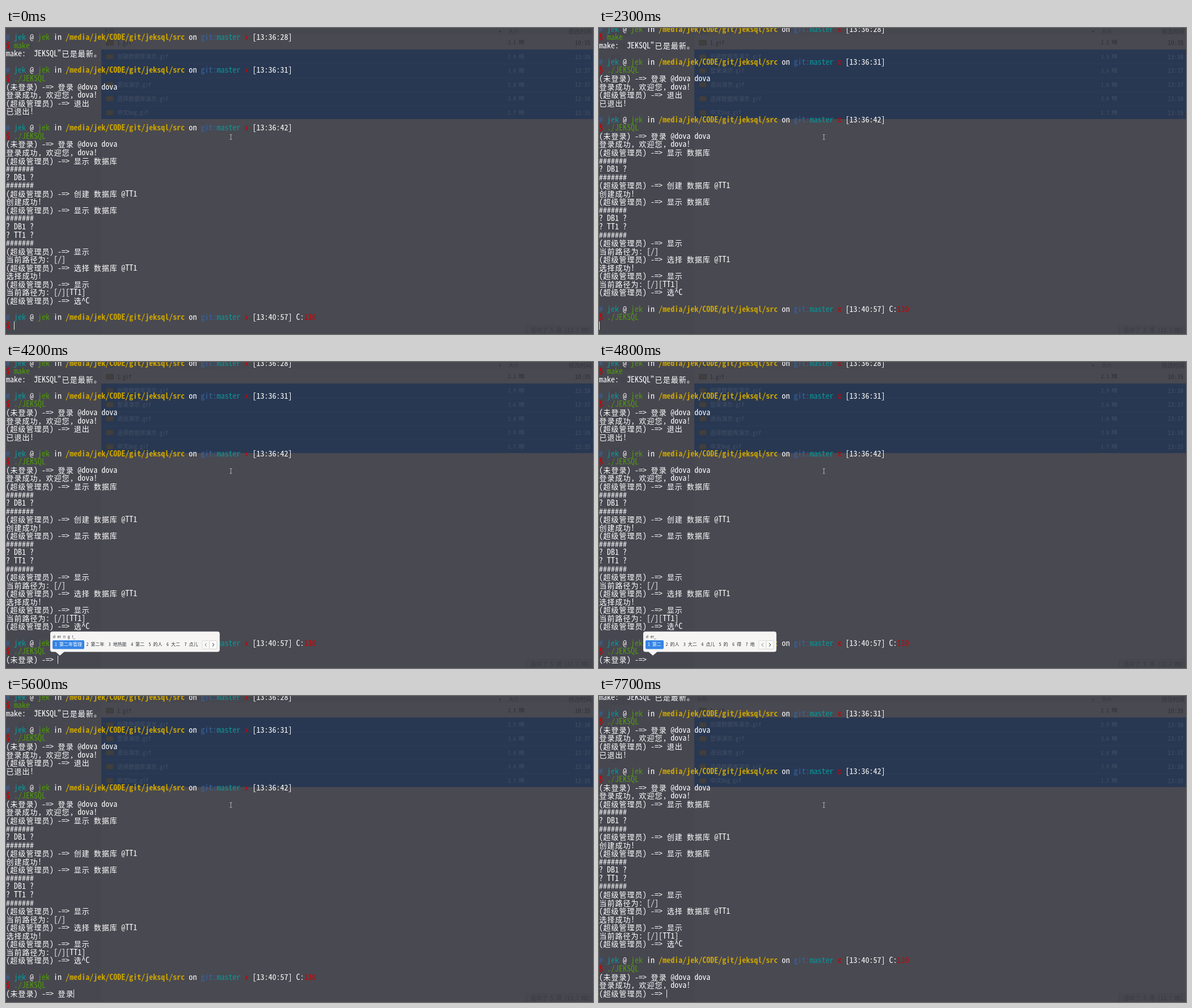
These frames come from a looping animation (1035 px wide and 541 px high, 8000 ms). An HTML page with a canvas:

```html
<!DOCTYPE html>
<html lang="zh-CN">
<head>
<meta charset="utf-8">
<title>Terminal session</title>
<style>
html, body { margin: 0; width: 100%; height: 100%; overflow: hidden; background: #494951; }
canvas { display: block; width: 1035px; height: 541px; }
</style>
</head>
<body>
<canvas id="stage"></canvas>
<script>
const W = 1035, H = 541, LOOP = 8000;
const CELL = 7.008, LINE = 14.557, LAST_Y = 526;
const MONO = '"Noto Sans Mono CJK SC", "Noto Sans CJK SC", "Noto Sans CJK", "Noto Sans Mono", monospace';
const SANS = '"Noto Sans CJK SC", "Noto Sans CJK", "Noto Sans", sans-serif';
const COLORS = {
  w: '#ffffff', b: '#3465a4', c: '#06989a', g: '#4e9a06',
  y: '#c9a400', r: '#cc0000', R: '#cc0000', d: '#5a5c5b', u: '#ffffff'
};
const BOLD = 'yR';

const canvas = document.getElementById('stage');
const ctx = canvas.getContext('2d');
const dpr = window.devicePixelRatio || 1;
canvas.width = W * dpr;
canvas.height = H * dpr;
ctx.scale(dpr, dpr);

// Choose the size at which one Latin letter fills one cell.
ctx.font = `100px ${MONO}`;
const latinSize = CELL * 100 / ctx.measureText('0').width;
const wideSize = 13;

const prompt = (time, tail = '') =>
  `~b# ~cjek~w @ ~gjek~w in ~y/media/jek/CODE/git/jeksql/src~w on ~bgit:~cmaster~r x~w [${time}]${tail}`;
const command = text => `~R$ ~g${text}`;
const guest = '(未登录) -=> ';
const admin = '(超级管理员) -=> ';
const rule = '#######';
const welcome = '登录成功，欢迎您，dova!';

const history = [
  prompt('13:36:28'), command('make'), 'make: “JEKSQL”已是最新。', '',
  prompt('13:36:31'), command('./JEKSQL'),
  guest + '登录 @dova dova', welcome, admin + '退出', '已退出!', '',
  prompt('13:36:42'), command('./JEKSQL'),
  guest + '登录 @dova dova', welcome,
  admin + '显示 数据库', rule, '? DB1 ?', rule,
  admin + '创建 数据库 @TT1', '创建成功!',
  admin + '显示 数据库', rule, '? DB1 ?', '? TT1 ?', rule,
  admin + '显示', '当前路径为: [/]',
  admin + '选择 数据库 @TT1', '选择成功!',
  admin + '显示', '当前路径为: [/][TT1]',
  admin + '选^C', '',
  prompt('13:40:57', ' C:~r130')
];
const started = [...history, command('./JEKSQL')];
const loggedIn = [...started, guest + '登录 @dova dova', welcome];

// Each step: start time, finished lines, current line, cursor column (-1 hides it).
const shell = [
  [0, history, '~R$ ', 2],
  [100, history, '~R$ ', -1],
  [600, history, '~R$ ', 2],
  [1100, history, '~R$ ~g.~d/JEKSQL', 3],
  [1300, history, '~R$ ~u./~dJEKSQL', 4],
  [1700, history, '~R$ ~R./J~dEKSQL', 5],
  [2100, history, command('./JEKSQL'), 10],
  [2300, started, '', 0],
  [2400, started, guest, 13],
  [3500, started, guest, -1],
  [4000, started, guest, 13],
  [4800, started, guest, -1],
  [5300, started, guest, 13]
];
const typed = [
  [5600, '登录'], [5700, '登录 '], [6200, '登录 @'], [6500, '登录 @do'],
  [6700, '登录 @dov'], [6800, '登录 @dova'], [7000, '登录 @dova '],
  [7100, '登录 @dova d'], [7300, '登录 @dova do'],
  [7400, '登录 @dova dov'], [7500, '登录 @dova dova']
];
for (const [time, text] of typed) shell.push([time, started, guest + text, 15 + text.length]);
shell.push([7700, loggedIn, admin, 17]);

// Input method window: start time, spelling, candidates.
const popup = [
  [0, '', ''],
  [3800, 'd', '的 都 大 到 对 点 多'],
  [4000, 'de', '的 得 德 地 嘚 锝 底'],
  [4100, 'd er n', '第二年 第二 的人 大二 点儿 的 得'],
  [4200, 'd er n g l', '第二年管理 第二年 地热能 第二 的人 大二 点儿'],
  [4500, 'd er n g', '第二年个 第二年 地热能 第二 的人 大二 点儿'],
  [4700, 'd er n', '第二年 第二 的人 大二 点儿 的 得'],
  [4800, 'd er', '第二 的人 大二 点儿 的 得 地'],
  [4900, 'de', '的 得 德 地 嘚 锝 底'],
  [5200, 'den', '得'],
  [5300, 'deng', '等 登 灯 瞪 蹬 凳 噔'],
  [5400, 'deng l', '登录 等了 登陆 等量 等离 灯笼 灯亮'],
  [5600, '', '']
];
const at = (steps, t) => steps.findLast(step => step[0] <= t);

function label(text, x, y, size, color, family = SANS) {
  ctx.font = `300 ${size}px ${family}`;
  ctx.fillStyle = color;
  ctx.fillText(text, x, y + size * 0.36);
}

function box(x, y, w, h, r, fill, stroke) {
  ctx.beginPath();
  ctx.roundRect(x, y, w, h, r);
  ctx.fillStyle = fill;
  ctx.fill();
  if (stroke) {
    ctx.strokeStyle = stroke;
    ctx.lineWidth = 0.6;
    ctx.stroke();
  }
}

function drawBackdrop() {
  ctx.fillStyle = '#494951';
  ctx.fillRect(0, 0, W, H);
  ctx.fillStyle = '#474750';
  ctx.fillRect(0, 0, 168, H);
  ['最近使用', '主目录', '桌面', '文档', '下载', '音乐', '图片', '视频', '回收站', '网络']
    .forEach((name, i) => label(name, 20, 11 + i * 20.6, 9, '#42424a'));

  ctx.fillStyle = '#47474f';
  ctx.fillRect(168, 0, W - 168, 12);
  label('名称', 173, 6, 9, '#3a3a42');
  label('▾', 869, 6, 8, '#35353c');
  label('大小', 886, 6, 9, '#35353c');
  label('修改时间', 992, 6, 10, '#35353c');

  ctx.fillStyle = '#293852';
  ctx.fillRect(168, 38, W - 168, 123);
  const files = [
    ['1.gif', '2.1', '10:35'], ['创建数据库演示.gif', '2.9', '13:38'],
    ['登录演示.gif', '3.6', '13:37'], ['退出演示.gif', '1.8', '13:37'],
    ['选择数据库演示.gif', '3.8', '13:38'], ['中文bug.gif', '1.7', '13:35']
  ];
  files.forEach(([name, size, time], i) => {
    const y = 26 + i * 24.75;
    const ink = i ? '#434f65' : '#2f2f36';
    if (i > 1) {
      ctx.fillStyle = '#2f3d57';
      ctx.fillRect(168, y - 12.7, W - 168, 0.8);
    }
    box(176.5, y - 4.5, 13, 9, 1.5, '#403f3d', '#33363a');
    label(name, 196, y, 10, ink, MONO);
    label(size + ' MB', 885, y, 9.6, ink, MONO);
    label(time, 1003, y, 11, ink, MONO);
  });
  box(917, 526, 125, 20, 2, '#47474f', '#42424a');
  label('选中了 5 项 (13.7 MB)', 925, 534, 10, '#3a3a42', MONO);
}

const isWide = ch => /[\u3000-\u9fff\uff00-\uffef]/.test(ch);

function drawLine(text, y) {
  let col = 0;
  const parts = ('~w' + text).split(/~(.)/);
  for (let i = 1; i < parts.length; i += 2) {
    const style = parts[i], from = col;
    const latinFont = `${BOLD.includes(style) ? 'bold ' : ''}${latinSize}px ${MONO}`;
    const wideFont = `300 ${wideSize}px ${SANS}`;
    ctx.fillStyle = COLORS[style];
    for (const ch of parts[i + 1]) {
      const wide = isWide(ch);
      ctx.font = wide ? wideFont : latinFont;
      ctx.fillText(ch, col * CELL + (wide ? CELL - wideSize / 2 : 0), y + 4.7);
      col += wide ? 2 : 1;
    }
    if (style === 'u') ctx.fillRect(from * CELL, y + 6.5, (col - from) * CELL, 0.7);
  }
}

function drawPointer() {
  ctx.strokeStyle = '#b8b8bc';
  ctx.lineWidth = 0.9;
  ctx.beginPath();
  ctx.moveTo(396.5, 188.5);
  ctx.lineTo(396.5, 197);
  for (const y of [188.5, 197]) {
    ctx.moveTo(394.5, y);
    ctx.lineTo(398.5, y);
  }
  ctx.stroke();
}

function drawArrow(x, dir, color) {
  ctx.strokeStyle = color;
  ctx.lineWidth = 1;
  ctx.beginPath();
  ctx.moveTo(x - dir * 1.4, 497);
  ctx.lineTo(x + dir * 1.4, 500);
  ctx.lineTo(x - dir * 1.4, 503);
  ctx.stroke();
}

function drawPopup(spelling, list) {
  const words = list.split(' ');
  const many = words.length > 1;
  const widths = words.map(word => 15.4 + 8 * word.length);
  const arrowsX = 86 + widths.reduce((a, b) => a + b, 0);
  const right = many ? arrowsX + 31 : 110;
  const top = many ? 476.5 : 479;

  box(78, top, right - 78, 512.5 - top, 4, '#f6f5f4');
  ctx.beginPath();
  ctx.moveTo(87, 512);
  ctx.lineTo(95, 519);
  ctx.lineTo(103, 512);
  ctx.fill();

  ctx.wordSpacing = '2.1px';
  label(spelling + '_', 83, many ? 486 : 488.5, 6.9, '#2e3436', '"Liberation Sans", sans-serif');
  ctx.wordSpacing = '0px';

  const y = many ? 499 : 501.5;
  box(82, many ? 492 : 495, widths[0] + 0.6, many ? 15.5 : 13, 2, '#3584e4');
  let x = 86;
  words.forEach((word, i) => {
    const ink = i ? '#2e3436' : '#ffffff';
    label(i + 1, x, y, 8, ink, MONO);
    label(word, x + 8, y, 8, ink);
    x += widths[i];
  });
  if (many) {
    box(arrowsX, 492.5, 13, 15, 2, '#f8f8f7', '#d2cecb');
    box(arrowsX + 13, 492.5, 13, 15, 2, '#fbfbfa', '#c4c0bc');
    drawArrow(arrowsX + 6.5, -1, '#777b7c');
    drawArrow(arrowsX + 19.5, 1, '#202426');
  }
}

function draw(t) {
  drawBackdrop();
  const [, lines, input, cursor] = at(shell, t);
  lines.forEach((text, i) => drawLine(text, LAST_Y - (lines.length - i) * LINE));
  drawLine(input, LAST_Y);
  if (cursor >= 0) {
    ctx.fillStyle = '#ffffff';
    ctx.fillRect(cursor * CELL, 519, 0.9, 14.5);
  }
  drawPointer();
  const [, spelling, words] = at(popup, t);
  if (words) drawPopup(spelling, words);
}

function tick() {
  draw(performance.now() % LOOP);
  requestAnimationFrame(tick);
}
tick();
</script>
</body>
</html>
```
